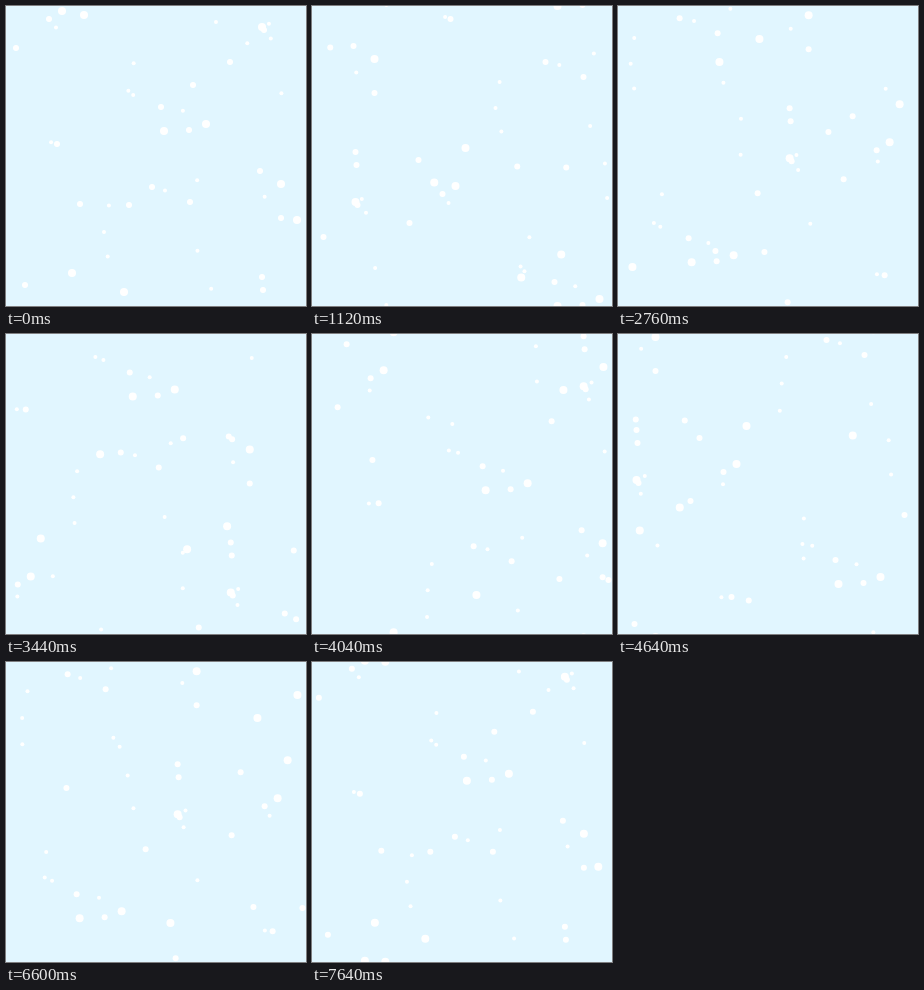
An HTML page for the animation above (7.68 s loop, 300 by 300 pixels).

```html
<!DOCTYPE html>
<html lang="en">
<head>
<meta charset="utf-8">
<title>Snowfall</title>
<style>
  html, body { margin: 0; width: 100%; height: 100%; overflow: hidden; background: #e1f6ff; }
  svg { display: block; width: 100%; height: 100%; }
</style>
</head>
<body>
<svg viewBox="0 0 300 300">
  <g id="snow" fill="#fff"></g>
  <use href="#snow" x="300"/>
  <use href="#snow" y="300"/>
  <use href="#snow" x="300" y="300"/>
</svg>
<script>
const SIZE = 300, LOOP = 7680, STEP = 40, MARGIN = 6;
const SLOW = 2, FAST = 3; // sideways laps per loop; flakes fall twice as far
const LARGE = 4, MEDIUM = 3, SMALL = 2;

let seed = 7;
function random() {
  seed = seed * 16807 % 2147483647;
  return seed / 2147483647;
}

const snow = document.getElementById("snow");
const flakes = [];

function addFlake(r, laps, x, y, sway = 0, phase = 0) {
  const node = document.createElementNS("http://www.w3.org/2000/svg", "circle");
  node.setAttribute("r", r);
  snow.append(node);
  flakes.push({ node, laps, x, y, sway, phase });
}

// Places flakes at "x,y" starting points.
function place(r, laps, points) {
  for (const point of points.split(" ")) addFlake(r, laps, ...point.split(",").map(Number));
}

// The fine snow: mostly slow, each flake swaying a little on its own.
function scatter(count) {
  for (let i = 0; i < count; i++) {
    const laps = random() < 0.85 ? SLOW : FAST;
    addFlake(SMALL, laps, random() * SIZE, random() * SIZE, random() * 4, random() * 2 * Math.PI);
  }
}

place(LARGE, SLOW, "56,5 158,125 200,118 256,21 275,178 66,267");
place(LARGE, FAST, "78,9 291,214 118,286");
place(MEDIUM, SLOW, "43,13 10,42 155,101 183,124 258,24 224,56 51,138 146,181 184,196 254,165 275,212 19,279 256,271 257,284");
place(MEDIUM, FAST, "187,79 123,199 74,198");
scatter(19);

// Keeps a coordinate in [-MARGIN, SIZE - MARGIN); the copies fill the far edges.
const wrap = v => ((v + MARGIN) % SIZE + SIZE) % SIZE - MARGIN;

function draw(ms) {
  const t = Math.floor(ms % LOOP / STEP) * STEP / LOOP;
  for (const { node, laps, x, y, sway, phase } of flakes) {
    const drift = laps * SIZE * t;
    const swing = sway * Math.sin(2 * Math.PI * t + phase);
    node.setAttribute("cx", wrap(x + drift + swing));
    node.setAttribute("cy", wrap(y + 2 * drift - swing / 2));
  }
}

const start = performance.now();
function tick() {
  draw(performance.now() - start);
  requestAnimationFrame(tick);
}
tick();
</script>
</body>
</html>
```
